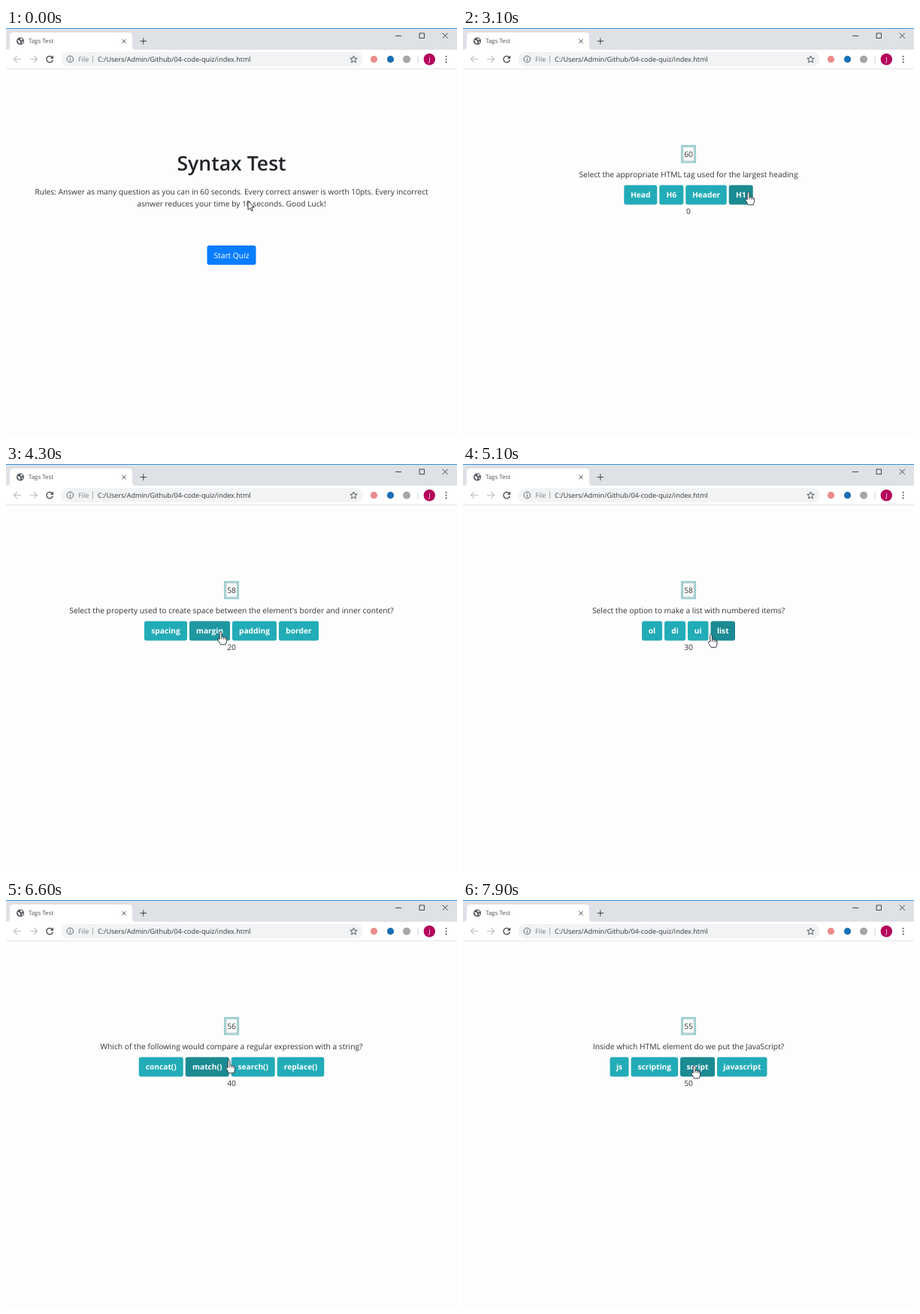
These frames come from a looping animation (600x544 px, 8 s). An HTML page:

```html
<!DOCTYPE html>
<html lang="en">
<head>
<meta charset="utf-8">
<title>Tags Test</title>
<style>
html, body { margin: 0; width: 100%; height: 100%; overflow: hidden; background: #fefdfe; }
svg { display: block; width: 600px; height: 544px; }
text { font-family: "Open Sans", "Noto Sans", sans-serif; font-size: 10.28px; fill: #303438; text-rendering: geometricPrecision; }
.mid { text-anchor: middle; }
.btn { font-weight: 700; font-size: 10.2px; fill: #fff; }
.line { fill: none; stroke: #444; stroke-width: 1; }
</style>
</head>
<body>
<svg viewBox="0 0 600 544">
  <rect width="600" height="544" fill="#fefdfe"/>

  <!-- browser frame -->
  <rect width="600" height="29" fill="#dee1e6"/>
  <rect width="600" height="1" fill="#3a92d2"/>
  <rect y="29" width="600" height="25" fill="#fff"/>
  <rect y="54" width="600" height="1" fill="#e3e4e6"/>
  <path d="M1 29Q5 29 5 25V11Q5 6 10 6H163Q168 6 168 11V25Q168 29 172 29Z" fill="#fff"/>
  <circle cx="19" cy="17.5" r="5" fill="#54585d"/>
  <path d="M15 16L17.6 16.6L19.4 18.4L18.4 21.6L16.6 19.6ZM19 13.4L22 14.6L21.4 16.6L19.6 16.2ZM20.6 18.6L23 18L21.6 20.8Z" fill="#fff"/>
  <text x="30" y="20.4" style="font-size:7.9px;fill:#4c5054">Tags Test</text>
  <path class="line" d="M154.4 15L159.6 20.2M159.6 15L154.4 20.2" stroke-width="1.2"/>
  <path class="line" d="M178.5 17.5H187M182.75 13.2V21.8" stroke-width="1.3"/>
  <path class="line" d="M518 10.5H526M550 7H556.5V13.5H550ZM580.8 6.8L587.8 13.8M587.8 6.8L580.8 13.8"/>
  <path class="line" d="M20 41.5H10.6M14.8 37.2L10.5 41.5L14.8 45.8M32 41.5H41.4M37.2 37.2L41.5 41.5L37.2 45.8" style="stroke:#bcbec1;stroke-width:1.2"/>
  <path class="line" d="M61.4 39A4.2 4.2 0 1 0 62.3 42.4" style="stroke:#505357;stroke-width:1.4"/>
  <path d="M63 36.6V40.9H58.7Z" fill="#505357"/>
  <rect x="73" y="32" width="402" height="19" rx="9.5" fill="#f1f3f4"/>
  <circle class="line" cx="85.3" cy="41.5" r="4.3" style="stroke:#5f6368"/>
  <path d="M84.8 38.9h1.1v1.1h-1.1zM84.8 41h1.1v3h-1.1z" fill="#5f6368"/>
  <text x="96" y="44.8" style="font-size:9.04px;fill:#7c8084">File</text>
  <rect x="115" y="36.5" width="1" height="10" fill="#a9acb0"/>
  <text x="122" y="44.8" style="font-size:9.04px;fill:#34373b">C:/Users/Admin/Github/04-code-quiz/index.html</text>
  <path class="line" d="M462.5 37L463.8 40.2L467.2 40.4L464.6 42.6L465.4 46L462.5 44.2L459.6 46L460.4 42.6L457.8 40.4L461.2 40.2Z" style="stroke:#505357"/>
  <circle cx="489.5" cy="41.7" r="4.6" fill="#ec8a8c"/>
  <circle cx="511.5" cy="41.7" r="4.6" fill="#1a6fb5"/>
  <circle cx="533" cy="41.7" r="5" fill="#a3a5a8"/>
  <rect x="547.5" y="37" width="1" height="10" fill="#cfd1d4"/>
  <circle cx="563.3" cy="41.7" r="7.7" fill="#b4045a"/>
  <text class="mid" x="563.3" y="44.7" style="font-size:8.5px;fill:#fff">J</text>
  <path d="M584.7 37h1.8v1.8h-1.8zM584.7 40.8h1.8v1.8h-1.8zM584.7 44.6h1.8v1.8h-1.8z" fill="#505357"/>

  <g id="intro">
    <text class="mid" x="300" y="190" style="font-size:26.6px;font-weight:600;fill:#212529">Syntax Test</text>
    <g style="font-size:10.2px">
      <text class="mid" x="300" y="221.5" style="font-size:10.2px">Rules: Answer as many question as you can in 60 seconds. Every correct answer is worth 10pts. Every incorrect</text>
      <text class="mid" x="300" y="238" style="font-size:10.2px">asnwer reduces your time by 10 seconds. Good Luck!</text>
    </g>
    <rect id="start" x="267.5" y="290" width="65" height="25.8" rx="2.75"/>
    <text class="mid" x="300" y="306.6" style="fill:#fff">Start Quiz</text>
  </g>

  <g id="quiz">
    <rect x="290.8" y="156.8" width="18.4" height="22.6" fill="none" stroke="#82c6ca" stroke-width="1.5"/>
    <rect x="292.6" y="158.6" width="14.8" height="19" fill="none" stroke="#9dbcc0" stroke-width="1"/>
    <text id="timer" class="mid" x="300" y="172.3"></text>
    <text id="ask" class="mid" x="300" y="198.7"></text>
    <g id="answers"></g>
    <text id="score" class="mid" x="300" y="247.7"></text>
  </g>

  <g id="cursor" fill="#fff" stroke="#26282b" stroke-width=".9" stroke-linejoin="round">
    <path id="arrow" d="M0 0V12L2.8 9.4L4.7 13.6L6.4 12.8L4.6 8.8H8.2Z"/>
    <path id="hand" d="M-1.3 1.2C-1.3 -.6 1.4 -.6 1.4 1.2V6.8C2 5.8 4 6 4 7.2C5 6.4 6.3 6.8 6.4 8C7.4 7.4 8.2 8.2 8.1 9.4V12.5L6.6 16.8H0L-3.6 10.8C-4.4 9.2 -2.6 8.2 -1.3 9.8ZM1.4 7V9.4M4 7.4V9.6M6.4 8.2V10"/>
  </g>
</svg>
<script>
const LOOP = 8000, STEP = 100, GAP = 3, TOP = 209.5, HIGH = 26;
const $ = id => document.getElementById(id);

const questions = [
  { at: 2200, ask: "Select the appropriate HTML tag used for the largest heading",
    labels: ["Head", "H6", "Header", "H1"], widths: [44, 32, 54.5, 32] },
  { at: 3300, ask: "Select the HTML tag used to create a hyperlink",
    labels: ["link", "a", "href", "url"], widths: [34, 24, 37, 31] },
  { at: 4300, ask: "Select the property used to create space between the element's border and inner content?",
    labels: ["spacing", "margin", "padding", "border"], widths: [57, 54, 59, 53] },
  { at: 5000, ask: "Select the option to make a list with numbered items?",
    labels: ["ol", "di", "ui", "list"], widths: [27, 28, 27.5, 32.5] },
  { at: 6200, ask: "Which of the following would compare a regular expression with a string?",
    labels: ["concat()", "match()", "search()", "replace()"], widths: [59, 58, 58, 62.5] },
  { at: 7500, ask: "Inside which HTML element do we put the JavaScript?",
    labels: ["js", "scripting", "script", "javascript"], widths: [25, 62.5, 46, 66.5] }
];

// button boxes, centred in a row
for (const q of questions) {
  let x = 300 - (q.widths.reduce((a, b) => a + b) + GAP * 3) / 2;
  q.boxes = q.widths.map(w => {
    const box = { x, y: TOP, w, h: HIGH };
    x += w + GAP;
    return box;
  });
}
const startBox = { x: 267.5, y: 290, w: 65, h: 25.8 };

// pointer path: time, x, y
const path = [
  [0, 322, 230.5], [200, 331, 227], [400, 320, 222], [600, 306, 228], [700, 302, 231],
  [800, 302, 231], [1000, 357, 232], [1300, 357, 232], [1500, 348, 370], [1700, 330, 485],
  [1900, 308, 390], [2000, 299.5, 311], [2400, 299.5, 311], [2800, 348, 250], [3000, 378.5, 221],
  [3100, 379.5, 219], [3300, 379, 221], [3500, 362, 252], [3700, 312, 256], [3900, 284, 226],
  [4300, 285.5, 224], [4700, 330, 226], [5200, 330, 228], [5400, 407, 222], [5600, 176, 206],
  [5800, 257, 197], [5900, 249, 222], [6200, 250, 223], [6600, 296.5, 214], [7000, 275, 223],
  [7500, 272, 224], [7800, 224, 228], [7830, 300, 222], [7900, 307.5, 221], [8000, 307.5, 221]
];

function pointer(t) {
  const i = Math.max(1, path.findIndex(k => k[0] >= t));
  const [t0, x0, y0] = path[i - 1], [t1, x1, y1] = path[i];
  const p = Math.max(0, (t - t0) / (t1 - t0));
  return [x0 + (x1 - x0) * p, y0 + (y1 - y0) * p];
}

const current = t => questions.filter(q => q.at <= t).length - 1;

// the page shown and the button under the pointer
function state(t) {
  const page = current(t), [x, y] = pointer(t);
  const boxes = page < 0 ? [startBox] : questions[page].boxes;
  const over = boxes.findIndex(b => x >= b.x && x <= b.x + b.w && y >= b.y && y <= b.y + b.h);
  return { page, x, y, over };
}

function mix(a, b, p) {
  return `rgb(${a.map((v, i) => Math.round(v + (b[i] - v) * p))})`;
}
const teal = p => mix([34, 172, 183], [27, 138, 146], p);
const blue = p => mix([10, 125, 255], [4, 104, 214], p);

let shown = -2;
function build(page) {
  if (page === shown) return;
  shown = page;
  $("intro").style.display = page < 0 ? "" : "none";
  $("quiz").style.display = page < 0 ? "none" : "";
  if (page < 0) return;
  const q = questions[page];
  $("ask").textContent = q.ask;
  $("score").textContent = page * 10;
  $("answers").innerHTML = q.boxes.map((b, i) =>
    `<rect x="${b.x}" y="${b.y}" width="${b.w}" height="${b.h}" rx="2.75"/>` +
    `<text class="mid btn" x="${b.x + b.w / 2}" y="226.4">${q.labels[i]}</text>`).join("");
}

function draw(time) {
  const t = Math.floor((time % LOOP) / STEP) * STEP;
  const now = state(t), before = state(Math.max(0, t - 60));
  const settled = before.page === now.page && before.over === now.over;
  const glow = i => i !== now.over ? 0 : settled ? 1 : 0.6;

  build(now.page);
  $("start").setAttribute("fill", blue(now.page < 0 ? glow(0) : 0));
  $("answers").querySelectorAll("rect").forEach((r, i) => r.setAttribute("fill", teal(glow(i))));
  $("timer").textContent = 60 - Math.max(0, Math.floor((t - 2300) / 1000));

  $("cursor").setAttribute("transform", `translate(${now.x} ${now.y})`);
  $("hand").style.display = now.over < 0 ? "none" : "";
  $("arrow").style.display = now.over < 0 ? "" : "none";
}

let begin;
function tick(now) {
  begin ??= now;
  draw(now - begin);
  requestAnimationFrame(tick);
}
draw(0);
requestAnimationFrame(tick);
</script>
</body>
</html>
```
